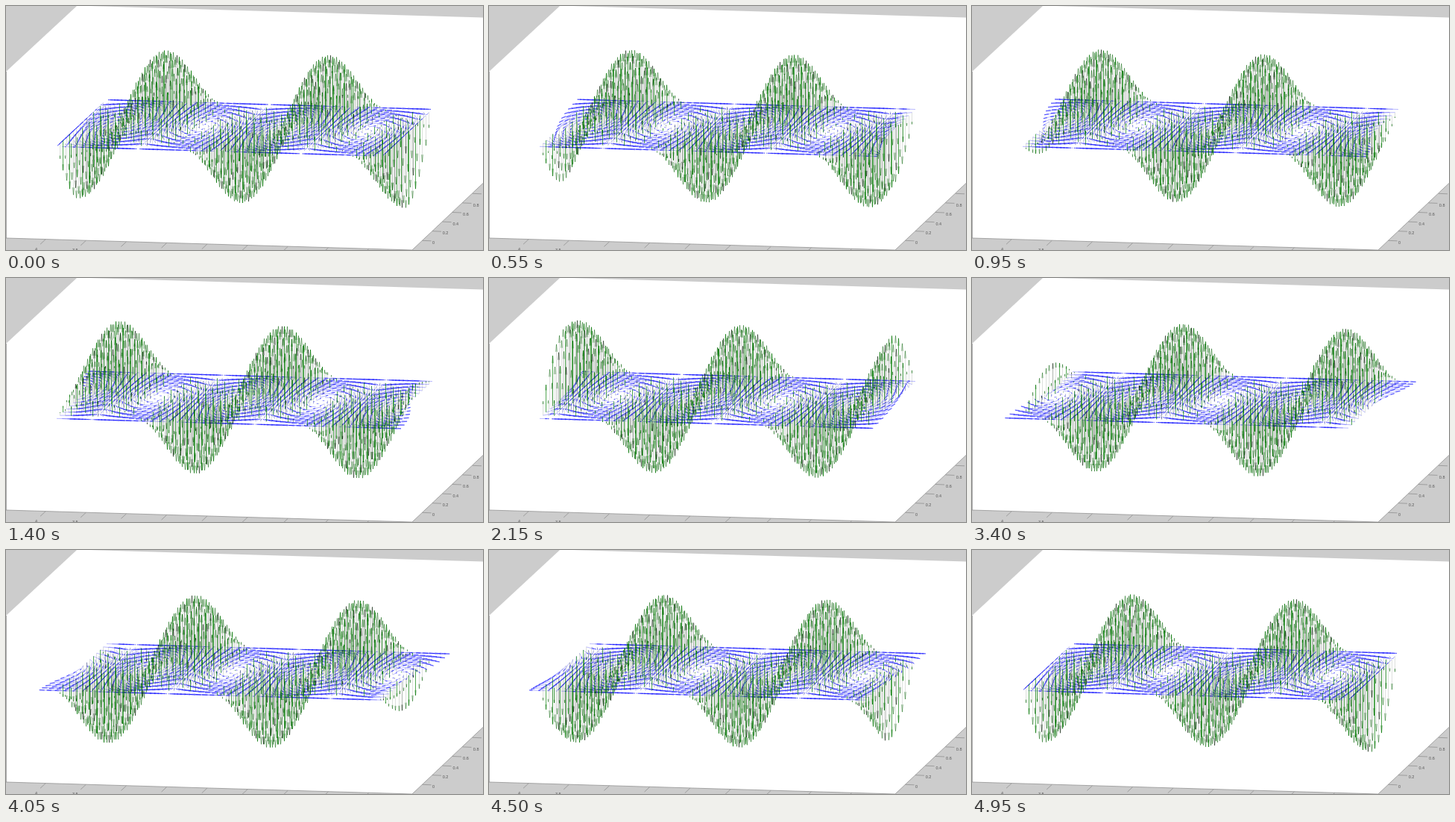
These frames come from a looping animation (640x327 px, 5000 ms). An HTML page with a canvas:

```html
<!DOCTYPE html>
<html>
<head>
<meta charset="utf-8">
<style>
  html, body { margin: 0; width: 100%; height: 100%; overflow: hidden; background: #ccc; }
  canvas { display: block; }
</style>
</head>
<body>
<canvas id="stage" width="640" height="327"></canvas>
<script>
const ctx = document.getElementById('stage').getContext('2d');
const LOOP = 5000, STEP = 50;
const COLS = 60, ROWS = 15;
const E_HEIGHT = 99;      // pixels at full field strength
const H_LENGTH = 0.234;   // plot units at full field strength

// Waveguide floor: u runs along its length, v across it, both 0..1
const project = (u, v) => [68 + 437 * u + 67 * v, 188.3 + 12.8 * u - 62.6 * v];

function line(x1, y1, x2, y2) {
  ctx.moveTo(x1, y1);
  ctx.lineTo(x2, y2);
}

function strokeAll(color, width, draw) {
  ctx.beginPath();
  draw();
  ctx.strokeStyle = color;
  ctx.lineWidth = width;
  ctx.stroke();
}

function head(x, y, dx, dy, size, spread) {
  const length = Math.hypot(dx, dy);
  if (length < 0.5) return;
  const bx = dx / length * size, by = dy / length * size;
  ctx.moveTo(x - bx - by * spread, y - by + bx * spread);
  ctx.lineTo(x, y);
  ctx.lineTo(x - bx + by * spread, y - by - bx * spread);
}

function drawAxes() {
  ctx.fillStyle = '#ccc';
  ctx.fillRect(0, 0, 640, 327);
  ctx.beginPath();
  [[95.5, -0.5], [640, 15.5], [640, 237.5], [545, 327], [0, 311], [0, 88]].forEach(p => ctx.lineTo(...p));
  ctx.fillStyle = '#fff';
  ctx.fill();
  strokeAll('#888', 0.7, () => {
    line(0.5, 88, 0.5, 311);
    line(0, 311, 545, 327);
    line(545, 327, 640, 237.5);
    for (let i = 0; i < 9; i++) {
      const x = 53 + 54.2 * i, y = 312.8 + 1.6 * i;
      line(x, y, x - 7, y + 6.5);
    }
    for (let i = 0; i < 6; i++) {
      const x = 558.5 + 13.5 * i, y = 314.3 - 12.6 * i;
      line(x, y, x + 12, y + 0.5);
    }
  });
  ctx.fillStyle = '#555';
  ctx.font = '5.5px "Liberation Sans", Arial, sans-serif';
  ['0', '0.2', '0.4', '0.6', '0.8'].forEach((s, i) => ctx.fillText(s, 572 + 13.7 * i, 319 - 12.6 * i));
  ctx.fillText('4', 39, 328);
  ctx.fillText('3.5', 89, 329);
}

// Travelling TE10 mode sampled on the grid
function sampleField(phase) {
  const arrows = [];
  for (let i = 0; i <= COLS; i++) {
    for (let j = 0; j <= ROWS; j++) {
      const u = i / COLS, v = j / ROWS;
      const theta = 2 * Math.PI * (2 * u + phase);
      const across = -Math.sin(Math.PI * v) * Math.cos(theta);
      const along = Math.cos(Math.PI * v) * Math.sin(theta);
      const [x, y] = project(u, v);
      const [hx, hy] = project(u + H_LENGTH * along / 4, v + H_LENGTH * across);
      const ex = Math.floor(x) + 0.5;   // vertical shafts stay crisp
      arrows.push({ x, y, hx, hy, ex, ey: y - E_HEIGHT * across, shade: (i * 7 + j * 5) % 9 });
    }
  }
  return arrows;
}

function draw(phase) {
  drawAxes();
  const arrows = sampleField(phase);
  strokeAll('rgba(0,0,255,0.8)', 0.35, () => arrows.forEach(a => line(a.x, a.y, a.hx, a.hy)));
  strokeAll('#00f', 0.4, () => arrows.forEach(a => {
    const dx = a.hx - a.x, dy = a.hy - a.y;
    head(a.hx, a.hy, dx, dy, Math.hypot(dx, dy) * 0.3, 0.1);
  }));

  const layers = [
    ['rgba(40,60,40,0.2)', '#060', a => a.shade > 2],
    ['rgba(0,125,0,0.85)', '#007000', a => a.shade === 1 || a.shade === 2],
    ['rgba(0,20,0,0.4)', '#001a00', a => a.shade === 0]
  ];
  for (const [color, , chosen] of layers) {
    strokeAll(color, 0.8, () => arrows.filter(chosen).forEach(a => line(a.ex, a.y, a.ex, a.ey)));
  }
  for (const [, color, chosen] of layers) {
    strokeAll(color, 0.45, () => arrows.filter(chosen).forEach(a => {
      const dy = a.ey - a.y;
      head(a.ex, a.ey, 0, dy, Math.min(10, Math.abs(dy) * 0.2), 0.09);
    }));
  }
}

function tick() {
  const step = Math.floor(performance.now() % LOOP / STEP);
  draw(step / (LOOP / STEP - 1));
  requestAnimationFrame(tick);
}
tick();
</script>
</body>
</html>
```
